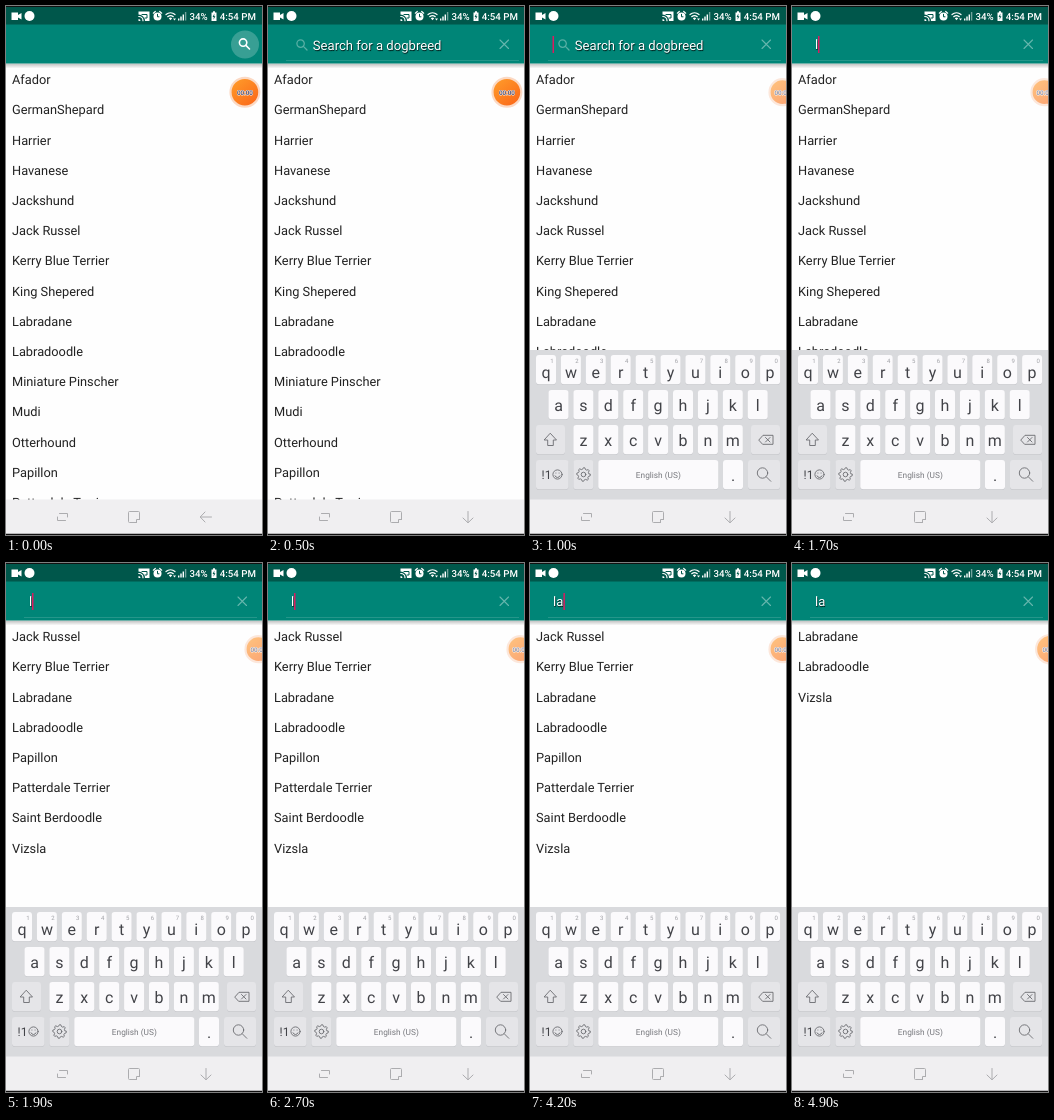
An HTML page for the animation above (5.1 s loop, 256 px wide and 529 px high).

```html
<!DOCTYPE html>
<html lang="en">
<head>
<meta charset="utf-8">
<title>Dog breed search</title>
<style>
  html, body { margin: 0; width: 100%; height: 100%; overflow: hidden; background: #fefefe; }
  svg { display: block; width: 100%; height: 100%; font-family: Roboto, sans-serif; text-rendering: geometricPrecision; }
  .line { fill: none; stroke-linecap: round; stroke-linejoin: round; }
  .query { font-size: 13.1px; fill: #fff; text-shadow: .6px .6px .8px rgba(0, 0, 0, .8); }
  #list { font-size: 12.8px; fill: #222; }
  #keys { fill: #424348; text-anchor: middle; }
</style>
</head>
<body>
<svg viewBox="0 0 256 529" preserveAspectRatio="none">
  <defs>
    <linearGradient id="shade" x2="0" y2="1">
      <stop stop-color="#000" stop-opacity=".25"/><stop offset="1" stop-color="#000" stop-opacity="0"/>
    </linearGradient>
    <linearGradient id="orange" x2=".8" y2="1">
      <stop stop-color="#ffa02c"/><stop offset="1" stop-color="#fb6818"/>
    </linearGradient>
    <g id="lens" class="line"><circle cx="-1.4" cy="-1.4" r="3.7"/><path d="M1.4 1.4 5 5"/></g>
  </defs>

  <rect width="256" height="529" fill="#fefefe"/>
  <g id="list"></g>

  <rect y="57.5" width="256" height="5" fill="url(#shade)"/>
  <rect width="256" height="57.5" fill="#008577"/>
  <rect width="256" height="18.5" fill="#00574b"/>

  <!-- Status bar -->
  <g fill="#fff" font-size="9.7" font-weight="500">
    <path d="M5.5 6.5h6.5v2.5l3.5-2v6.5l-3.5-2v2.500h-6.5z"/>
    <circle cx="23.500" cy="10" r="5"/>
    <path d="M132.500 5.500h11v9.500h-4.500a6.500 6.500 0 0 0-6.500-6.500z"/>
    <path d="M132.500 13a2 2 0 0 1 2 2h-2z"/>
    <circle cx="151.500" cy="10.500" r="4"/>
    <g class="line" stroke="#fff" stroke-width="1.200">
      <path d="M132.800 10.500a4.200 4.200 0 0 1 4.200 4.200"/>
      <path d="M147.300 7.200l2-1.700M155.700 7.200l-2-1.700"/>
      <path d="M160 8.500a7 7 0 0 1 9 0M161.700 10.700a4.400 4.400 0 0 1 5.600 0"/>
    </g>
    <g class="line" stroke="#00574b">
      <path d="M136 8.500h5v3.500h-2M151.500 8.300v2.500h1.500"/>
    </g>
    <path d="M162.800 12.300a2.600 2.600 0 0 1 3.400 0l-1.700 2z"/>
    <path d="M167 12.500h3l-1.500 2z"/>
    <path d="M172 12.500h1.400v2h-1.400zM174.300 10.500h1.400v4h-1.400zM176.600 8.500h1.400v6h-1.400z"/>
    <path d="M178.900 6h1.400v8.500h-1.400z" opacity=".45"/>
    <text x="183.500" y="13.600">34%</text>
    <path d="M205.500 6.500h1.500v-1.200h2v1.200h1.500v8.500h-5z"/>
    <path d="M208.400 7.500l-1.800 3.500h1.200l-.3 2.700 1.900-3.500h-1.200z" fill="#00574b"/>
    <text x="213.700" y="13.600">4:54 PM</text>
  </g>

  <!-- App bar -->
  <g id="closed">
    <circle id="ripple" cx="239" cy="38.500" r="14" fill="#fff"/>
    <use href="#lens" x="238.500" y="38" stroke="#fff" stroke-width="1.6"/>
  </g>
  <g id="open">
    <path d="M18 54.500H251" stroke="#fff" stroke-opacity=".14"/>
    <path class="line" d="M232 34l8.500 8.500M240.500 34l-8.500 8.500" stroke="#66b6ad" stroke-width="1.100"/>
    <g id="hint">
      <use href="#lens" x="34" y="39" stroke="#57afa4" stroke-width="1.300"/>
      <text class="query" x="44.800" y="44">Search for a dogbreed</text>
    </g>
    <text id="typed" class="query" x="23" y="43.200"></text>
    <rect id="cursor" y="30" width="1.500" height="17" fill="#d81b60"/>
  </g>

  <g id="keyboard">
    <rect y="344" width="256" height="150" fill="#d9dadd"/>
    <g id="keys"></g>
    <g class="line" stroke="#6b6c71" stroke-width=".9">
      <path d="M20.500 427.500l6 6.500h-3.200v5.500h-5.600v-5.500h-3.200z"/>
      <path d="M229 433.800l4-4.500h10v9h-10zM235.500 431.500l4.500 4.500M240 431.500l-4.500 4.500"/>
      <circle cx="27.500" cy="468.500" r="4.600"/><path d="M25 469.800a2.700 2.700 0 0 0 5 0M25.900 467v.1M29.100 467v.1"/>
      <circle cx="53.500" cy="468.500" r="2.300"/>
      <path id="gear"/>
      <circle cx="232.500" cy="467" r="5.200"/><path d="M236.300 470.800l4.500 4.500"/>
    </g>
  </g>

  <!-- Navigation bar -->
  <rect y="493.500" width="256" height="36" fill="#f0eff1"/>
  <g class="line" stroke="#acacaf">
    <path d="M53.500 507.500h8v3.500M59.500 514.500h-8v-3.500"/>
    <path d="M133.500 513.500v-7a1 1 0 0 0-1-1h-9a1 1 0 0 0-1 1v9a1 1 0 0 0 1 1h7M130.500 516.500v-3h3"/>
    <path id="back" d="M205.500 511h-11M199 506l-4.800 5 4.800 5"/>
  </g>

  <g id="bubble">
    <circle id="disc" fill="url(#orange)" stroke="#fbd9c4" stroke-width="2.200"/>
    <text id="clock" y="2.300" font-size="6.300" font-weight="500" text-anchor="middle"
      fill="#35365c" stroke="#fff" stroke-width=".9" paint-order="stroke"></text>
  </g>

  <path d="M0 0h256v1H0zM0 527.800h256v1.200H0z" fill="#101010"/>
</svg>
<script>
const LOOP = 5100, STEP = 100;
const $ = id => document.getElementById(id);
const show = (id, on) => $(id).setAttribute('display', on ? 'inline' : 'none');
const set = (id, attrs) => Object.entries(attrs).forEach(([k, v]) => $(id).setAttribute(k, v));

const breeds = ['Afador', 'GermanShepard', 'Harrier', 'Havanese', 'Jackshund', 'Jack Russel',
  'Kerry Blue Terrier', 'King Shepered', 'Labradane', 'Labradoodle', 'Miniature Pinscher', 'Mudi',
  'Otterhound', 'Papillon', 'Patterdale Terrier', 'Saint Berdoodle', 'Vizsla'];

const KEY = '#fbfafc', FUNCTION_KEY = '#e5e5e8', PRESSED_KEY = '#d2d3d7';

function key(x, y, width, label = '', { size = 16, fill = KEY, dy = 20.5, corner = '', ink = '#424348' } = {}) {
  const mid = x + width / 2;
  return `<rect x="${x}" y="${y + .7}" width="${width}" height="29.3" rx="3" fill="#c6c7cb"/>
    <rect data-key="${label}" x="${x}" y="${y}" width="${width}" height="29.3" rx="3" fill="${fill}"/>
    <text x="${mid}" y="${y + dy}" font-size="${size}" fill="${ink}">${label}</text>
    <text x="${mid + 6}" y="${y + 8}" font-size="6" fill="#a0a1a6">${corner}</text>`;
}

function buildKeyboard() {
  const row = (letters, x, y, options) => [...letters].map((c, i) =>
    key(x + i * 24.9, y, 20, c, options(i))).join('');
  const plain = () => ({});
  const blank = (x, y, width) => key(x, y, width, '', { fill: FUNCTION_KEY });
  $('keys').innerHTML =
    row('qwertyuiop', 6, 349, i => ({ dy: 22.5, corner: (i + 1) % 10 })) +
    row('asdfghjkl', 18.5, 384, plain) +
    row('zxcvbnm', 43.4, 419, plain) +
    blank(6, 419, 29) + blank(221, 419, 29) +
    blank(6, 454, 32.5) + blank(43.4, 454, 20) + blank(218, 454, 32) +
    key(68.3, 454, 120, 'English (US)', { size: 8.3, dy: 17.8, ink: '#77787d' }) +
    key(193, 454, 20, '.') +
    '<text x="16.5" y="473" font-size="12">!1</text>';

  // Eight teeth: the radius alternates in pairs around the hub.
  const rim = Array.from({ length: 32 }, (_, i) => {
    const angle = i * Math.PI / 16, r = i % 4 < 2 ? 6.8 : 5.3;
    return `${53.5 + r * Math.cos(angle)} ${468.5 + r * Math.sin(angle)}`;
  });
  set('gear', { d: `M${rim.join('L')}Z` });
}

let shownFilter = null;
function showList(filter) {
  if (filter === shownFilter) return;
  shownFilter = filter;
  $('list').innerHTML = breeds.filter(b => b.toLowerCase().includes(filter))
    .map((b, i) => `<text x="6" y="${78.1 + i * 30.2}">${b}</text>`).join('');
}

// Linear interpolation through [time, value] pairs, held at both ends.
function track(t, points) {
  const i = points.findIndex(p => p[0] > t);
  if (i < 0) return points.at(-1)[1];
  if (i === 0) return points[0][1];
  const [[t0, a], [t1, b]] = [points[i - 1], points[i]];
  return a + (b - a) * (t - t0) / (t1 - t0);
}

function render(t) {
  const typed = t < 1600 ? '' : t < 4100 ? 'l' : 'la';
  const focused = t >= 200;
  showList(t < 1800 ? '' : t < 4300 ? 'l' : 'la');

  show('closed', !focused);
  show('open', focused);
  show('hint', !typed);
  set('ripple', { 'fill-opacity': t < 100 ? .22 : .12 });
  $('typed').textContent = typed;

  const blinkStart = t < 1600 ? 0 : t < 4100 ? 1600 : 4100;
  show('cursor', t >= 1000 && Math.floor((t - blinkStart) / 500) % 2 === 0);
  set('cursor', { x: [22.5, 26, 33.4][typed.length] });

  show('keyboard', t >= 600);
  const pressed = t >= 1400 && t < 1600 ? 'l' : t >= 4000 && t < 4200 ? 'a' : null;
  for (const c of 'la') {
    document.querySelector(`[data-key=${c}]`).setAttribute('fill', c === pressed ? PRESSED_KEY : KEY);
  }
  set('back', { transform: t >= 400 ? 'rotate(-90 200 511)' : 'rotate(0)' });

  const x = track(t, [[600, 238.9], [900, 252.5], [4700, 252.5], [4900, 258.5]]);
  set('bubble', {
    transform: `translate(${x} 86.2)`,
    opacity: track(t, [[700, 1], [1000, .6]])
  });
  set('disc', { r: track(t, [[600, 14.4], [900, 13], [4700, 13], [4900, 14.4]]) });
  $('clock').textContent = '00:0' + Math.floor(t / 1000);
}

buildKeyboard();
function frame() {
  const t = performance.now() % LOOP;
  render(Math.floor(t / STEP) * STEP);
  requestAnimationFrame(frame);
}
frame();
</script>
</body>
</html>
```
